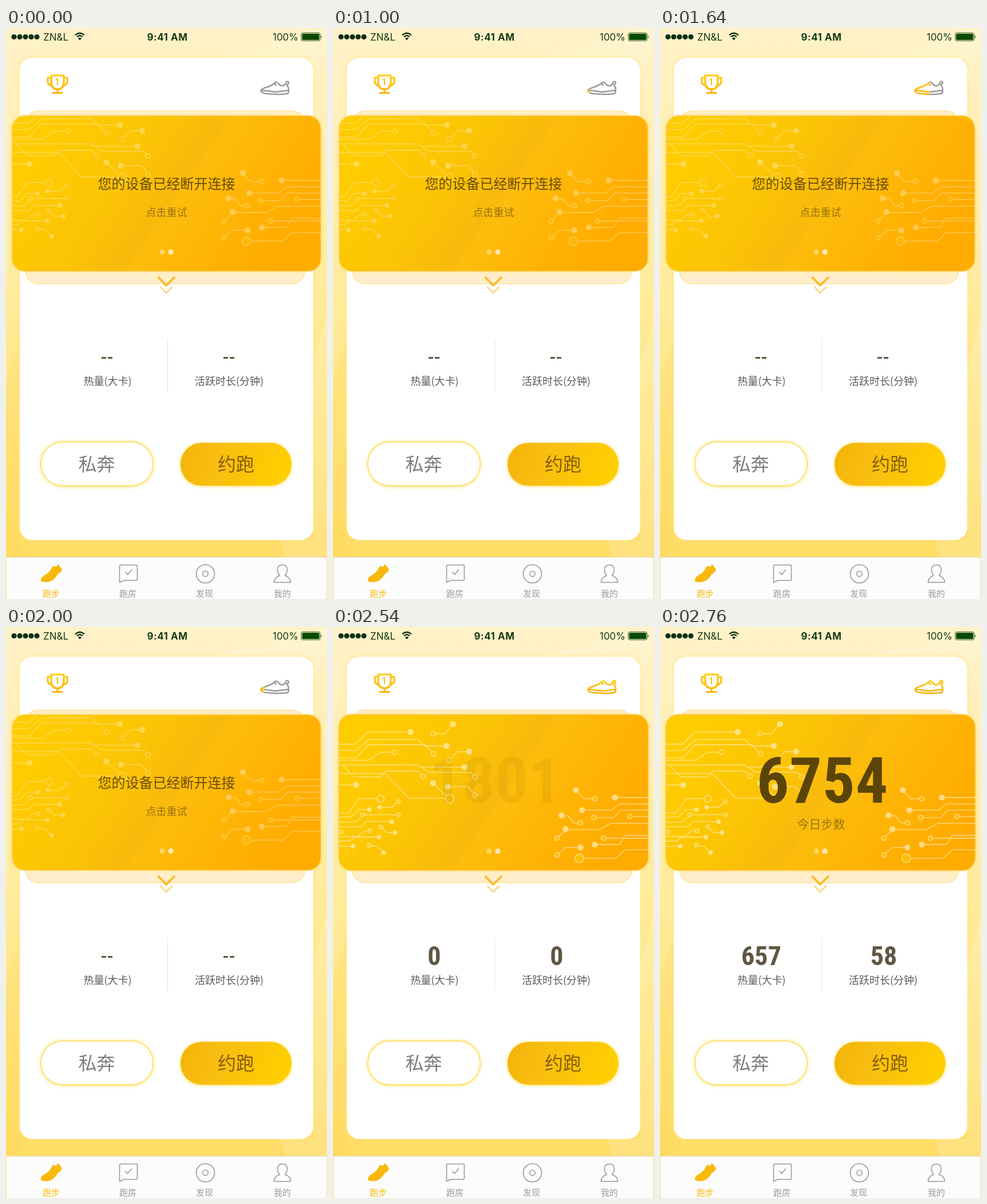
Animation of 561x998 px, one loop 4.88 s. Source, as an HTML page:

```html
<!DOCTYPE html>
<html lang="zh">
<head>
<meta charset="utf-8">
<style>
html, body { margin: 0; width: 100%; height: 100%; overflow: hidden; background: #ffe98f; }
svg { display: block; width: 100%; height: 100%; }
text { font-family: 'Noto Sans CJK SC', 'Noto Sans CJK', sans-serif; text-anchor: middle; }
.bar text { font-family: Inter, sans-serif; font-size: 17px; fill: #173a17; }
.num { font-family: 'Roboto Condensed', Roboto, sans-serif; font-stretch: 75%; font-weight: 600; }
.line { fill: none; stroke-linecap: round; stroke-linejoin: round; }
</style>
</head>
<body>
<svg viewBox="0 0 561 998" preserveAspectRatio="none">
  <defs>
    <linearGradient id="sky" x2="0" y2="1">
      <stop stop-color="#fff2c9"/><stop offset=".5" stop-color="#ffeb98"/><stop offset="1" stop-color="#ffd95c"/>
    </linearGradient>
    <linearGradient id="gold" gradientUnits="userSpaceOnUse" x1="90" y1="160" x2="470" y2="420">
      <stop stop-color="#ffcc00"/><stop offset=".35" stop-color="#fbc306"/><stop offset=".52" stop-color="#f8b90c"/>
      <stop offset=".55" stop-color="#fdbd0c"/><stop offset=".72" stop-color="#feb506"/><stop offset="1" stop-color="#ffab00"/>
    </linearGradient>
    <linearGradient id="pill" gradientUnits="userSpaceOnUse" x1="320" y1="735" x2="485" y2="790">
      <stop stop-color="#f5b60a"/><stop offset=".3" stop-color="#f9be12"/><stop offset=".5" stop-color="#fac20a"/><stop offset="1" stop-color="#ffcf00"/>
    </linearGradient>
    <linearGradient id="sun" x2="0" y2="1">
      <stop stop-color="#ffcb0a"/><stop offset="1" stop-color="#fbb20c"/>
    </linearGradient>
    <filter id="glow" x="-20%" y="-20%" width="140%" height="140%"><feGaussianBlur stdDeviation="3"/></filter>
    <clipPath id="cardClip"><rect x="11" y="154" width="539" height="271" rx="22"/></clipPath>
    <clipPath id="wipeClip"><rect id="wipe" x="442" y="84" width="0" height="40"/></clipPath>
    <path id="shoe" class="line" d="M446 108C452 103 461 104 469 96.500Q473 92.500 476 97Q479 101.500 484 101Q488 100 489 95.500Q490 92 494 95Q494.500 98 490.500 99Q494 103 494 109Q494.500 114.500 490 115Q472 117 453 114.500Q444.500 113 446 108M447 109C456 109 465 112.500 474 111.500T493 109M469 97L472 100"/>
  </defs>

  <rect width="561" height="998" fill="url(#sky)"/>
  <path d="M365 50L561 2V25L537 100V52Z" fill="#fff" opacity=".12"/>
  <path d="M0 612L24 545V924H0Z" fill="#ffd04a" opacity=".2"/>
  <path d="M480 895L488 924H561V500L537 590V895Z" fill="#fff" opacity=".16"/>

  <g class="bar">
    <path class="line" d="M14 15.500h0m10 0h0m10 0h0m10 0h0m10 0h0" stroke="#0f2f14" stroke-width="9.200"/>
    <text x="87" y="21.500">ZN&amp;L</text>
    <path d="M121 12.500Q129 5.500 137 12.500M124 15.500Q129 11 134 15.500" fill="none" stroke="#0f2f14" stroke-width="2.300"/>
    <path d="M126 18Q129 15.500 132 18L129 21.500Z" fill="#0f2f14"/>
    <text x="282" y="21.500" font-weight="700" letter-spacing=".5">9:41 AM</text>
    <text x="488.500" y="21.500">100%</text>
    <rect x="516" y="8.500" width="33" height="14" rx="2.500" fill="none" stroke="#2c5a20"/>
    <rect x="517.500" y="10" width="30" height="11" rx="1.500" fill="#0b4a06"/>
    <path d="M550.500 13Q553 15.500 550.500 18Z" fill="#0b4a06"/>
  </g>

  <rect x="24" y="52" width="513" height="844" rx="22" fill="#ffdf70" filter="url(#glow)" opacity=".8"/>
  <rect x="24" y="52" width="513" height="843" rx="22" fill="#fff"/>

  <g class="line" stroke="url(#sun)" stroke-width="3.200">
    <path d="M79 83H101V96Q100 107 90 107T79 96ZM79 87H73V94Q73 99 80 101M101 87H107V94Q107 99 100 101M90 107V113M82 113.500H98"/>
    <path d="M87.500 90.500L90 88.500V99" stroke-width="2"/>
  </g>
  <use href="#shoe" stroke="#999" stroke-width="2.500"/>
  <g clip-path="url(#wipeClip)"><use href="#shoe" stroke="#fff" stroke-width="3"/><use href="#shoe" stroke="url(#sun)" stroke-width="2.700"/></g>

  <rect x="34" y="145" width="488" height="302" rx="22" fill="#ffeec9" stroke="#ffe39a" stroke-width="1.500"/>
  <g id="card">
    <rect x="11" y="153" width="539" height="272" rx="22" fill="#ffd35c" filter="url(#glow)" opacity=".55"/>
    <rect x="11" y="153.500" width="539" height="271.500" rx="22" fill="url(#gold)" stroke="#fdca4c" stroke-width="1.500"/>
    <g clip-path="url(#cardClip)"><g id="circuits"></g></g>
    <path class="line" d="M273 391.500h0" stroke="#fff" stroke-opacity=".36" stroke-width="9.500"/>
    <path class="line" d="M288 391.500h0" stroke="#fff" stroke-opacity=".66" stroke-width="9.500"/>
  </g>
  <g id="offline">
    <text x="280.500" y="281" font-size="24" fill="#6b4a05">您的设备已经断开连接</text>
    <text x="280.500" y="329" font-size="18" fill="#99700f">点击重试</text>
  </g>
  <text id="steps" class="num" x="284" y="307" font-size="112" letter-spacing="1" fill="#5b4408"></text>
  <text id="caption" x="281.500" y="352" font-size="21" fill="#9b710c">今日步数</text>
  <path class="line" d="M266.500 436L280 450L294 436" stroke="#fbb825" stroke-width="3.600"/>
  <path class="line" d="M270.500 453L280 463L290 453" stroke="#fddb94" stroke-width="3.200"/>

  <path d="M282.500 544V637" stroke="#e4e4e4"/>
  <path id="dashes" d="M167 576.500h8m3 0h8M380 576.500h8m3 0h8" stroke="#5c523c" stroke-width="3"/>
  <g font-size="46" fill="#5f5744">
    <text id="heat" class="num" x="177" y="590.500"></text>
    <text id="mins" class="num" x="391" y="590.500"></text>
  </g>
  <g font-size="18" fill="#5a5a5a">
    <text x="177.500" y="624">热量(大卡)</text>
    <text x="390" y="624">活跃时长(分钟)</text>
  </g>

  <rect x="60" y="723" width="198" height="79" rx="39" fill="#ffe27a" filter="url(#glow)"/>
  <rect x="61" y="723.500" width="196" height="76.500" rx="38" fill="#fff" stroke="#ffe06a" stroke-width="1.800"/>
  <rect x="305" y="726" width="194" height="75" rx="37" fill="#ffdd60" filter="url(#glow)"/>
  <rect x="305" y="725" width="194" height="75" rx="37" fill="url(#pill)"/>
  <g font-size="32" font-weight="300">
    <text x="158.500" y="774" fill="#7c7c7c">私奔</text>
    <text x="402" y="774" fill="#845c08">约跑</text>
  </g>

  <rect x="1" y="925" width="559" height="73" fill="#fcfcfc"/>
  <path d="M0 925H561" stroke="#dcd8cc"/>
  <path d="M61 967Q60 960 68 956Q76 952 81 942Q82 939 85 941Q88 943 90 938Q92 937 94 941L98 946Q97 951 90 955Q86 963 78 967Q70 970 61 967Z" fill="#f9b90a"/>
  <g class="line" stroke="#999" stroke-width="1.600">
    <path d="M201 938.500H227Q229.500 938.500 229.500 941V963Q229.500 965.500 227 965.500H206L198.500 969V941Q198.500 938.500 201 938.500ZM208.500 951L212.500 955.500L219.500 947"/>
    <circle cx="348.500" cy="954" r="16"/><circle cx="348.500" cy="954" r="4.700"/>
    <path d="M478.500 957Q474.500 953 474.500 947Q474.500 938.500 483 938.500T491.500 947Q491.500 953 487.500 957Q497.500 960 497.500 969H468.500Q468.500 960 478.500 957Z"/>
  </g>
  <g font-size="15" fill="#999">
    <text x="79" y="994" fill="#fbb90a">跑步</text>
    <text x="213" y="994">跑房</text>
    <text x="347" y="994">发现</text>
    <text x="483" y="994">我的</text>
  </g>
</svg>
<script>
const LOOP = 4880, TICK = 20;
const $ = id => document.getElementById(id);
const ramp = (t, from, to) => Math.min(1, Math.max(0, (t - from) / (to - from)));

// Each cluster: resting wires, filled nodes, ring nodes, and its offset while offline.
const clusters = [
  { shift: [0, -38.5],
    wires: 'M11 205H40L61 184H136M11 216H41L63 197H149L160 208H199M11 229H41L62 206H161L173 219M11 233H63L84 219H104' +
      'M11 241H148L152 245H230M17 241L37 262H84L93 252H149L156 259M11 276H38M155 245L167 254H240L245 258' +
      'M11 256H92L132 299H196M175 273L198 295M201 279H236L246 290M207 173L195 187H179M238 218H218L206 230',
    dots: '136,184 199,208 230,245 41,276 175,273 201,279 210,170 238,218',
    rings: '108,219 176,222 158,261 248,262 248,294 175,187 203,233', big: '204,300' },
  { shift: [-9, -30],
    wires: 'M11 325H28L46 300H78M82 315H103L112 307M11 332H33L46 319H60M11 341H40L55 328H111M11 349H50L58 340H99' +
      'M86 351L94 359H105M11 366H44L56 356H61M11 374H30L38 367H77M11 383H32M67 382H76L86 391',
    dots: '82,315 64,319 103,340 109,359 81,367 36,383 89,394', small: true,
    rings: '115,305 115,328 84,349 16,358 65,356 64,381 52,328', big: '84,300' },
  { shift: [-10, -31.5],
    wires: 'M427 289L438 300H453M492 298H560M435 320H486L500 309H560M459 333H490L502 320H560M522 331H560M403 330H411L420 342H428' +
      'M394 366L406 354H465L485 343H560M476 369H560M457 380H500L510 364H560M394 396L406 385H428M438 404H494L510 389H560',
    dots: '424,285 492,298 435,320 399,329 406,353 457,380 432,385',
    rings: '457,300 455,333 518,331 432,342 391,369 472,369 391,398', big: '430,404' },
];

const circles = (list, r, paint) => list.split(' ').map(p => {
  const [x, y] = p.split(',');
  return `<circle cx="${x}" cy="${y}" r="${r}" ${paint}/>`;
}).join('');

$('circuits').innerHTML = clusters.map(c => {
  const k = c.small ? 0.75 : 1, ring = 'fill="#ffc60a" stroke="#fff3d0" stroke-width="1.500"';
  return `<g><path d="${c.wires}" fill="none" stroke="#fff3d0" stroke-width="1.300"/>` +
    circles(c.dots, 5.2 * k, 'fill="#fff0c0"') + circles(c.rings, 4 * k, ring) +
    circles(c.big, c.small ? 6 : 7.5, ring) + '</g>';
}).join('');
const groups = [...$('circuits').children];

// The yellow wipe runs forward, back, rests briefly, and stays full on its third pass.
function wipeLevel(t) {
  if (t >= 2400) return 1;
  const p = t % 970;
  return p < 460 ? p / 460 : Math.max(0, 1 - (p - 460) / 440);
}

function draw(time) {
  const t = Math.floor(time / TICK) * TICK;
  $('wipe').setAttribute('width', 2 + 52 * wipeLevel(t));

  const move = ramp(t, 2400, 2540);
  groups.forEach((g, i) => {
    const [x, y] = clusters[i].shift.map(v => v * (1 - move));
    g.setAttribute('transform', `translate(${x} ${y})`);
  });
  $('circuits').setAttribute('opacity', 0.4 + 0.28 * move);
  $('card').setAttribute('transform', `translate(280.5 289.5) scale(${1 + 0.003 * move}) translate(-280.5 -289.5)`);
  $('offline').setAttribute('opacity', 1 - ramp(t, 2400, 2460));

  const count = ramp(t, 2460, 2760), stats = ramp(t, 2540, 2760), live = t >= 2460;
  $('steps').setAttribute('opacity', count * count);
  $('caption').setAttribute('opacity', stats);
  $('steps').textContent = Math.round(6754 * count);
  $('dashes').setAttribute('opacity', live ? 0 : 1);
  $('heat').textContent = live ? Math.round(657 * stats) : '';
  $('mins').textContent = live ? Math.round(58 * stats) : '';
}

const start = performance.now();
function frame() {
  draw((performance.now() - start) % LOOP);
  requestAnimationFrame(frame);
}
draw(0);
requestAnimationFrame(frame);
</script>
</body>
</html>
```
